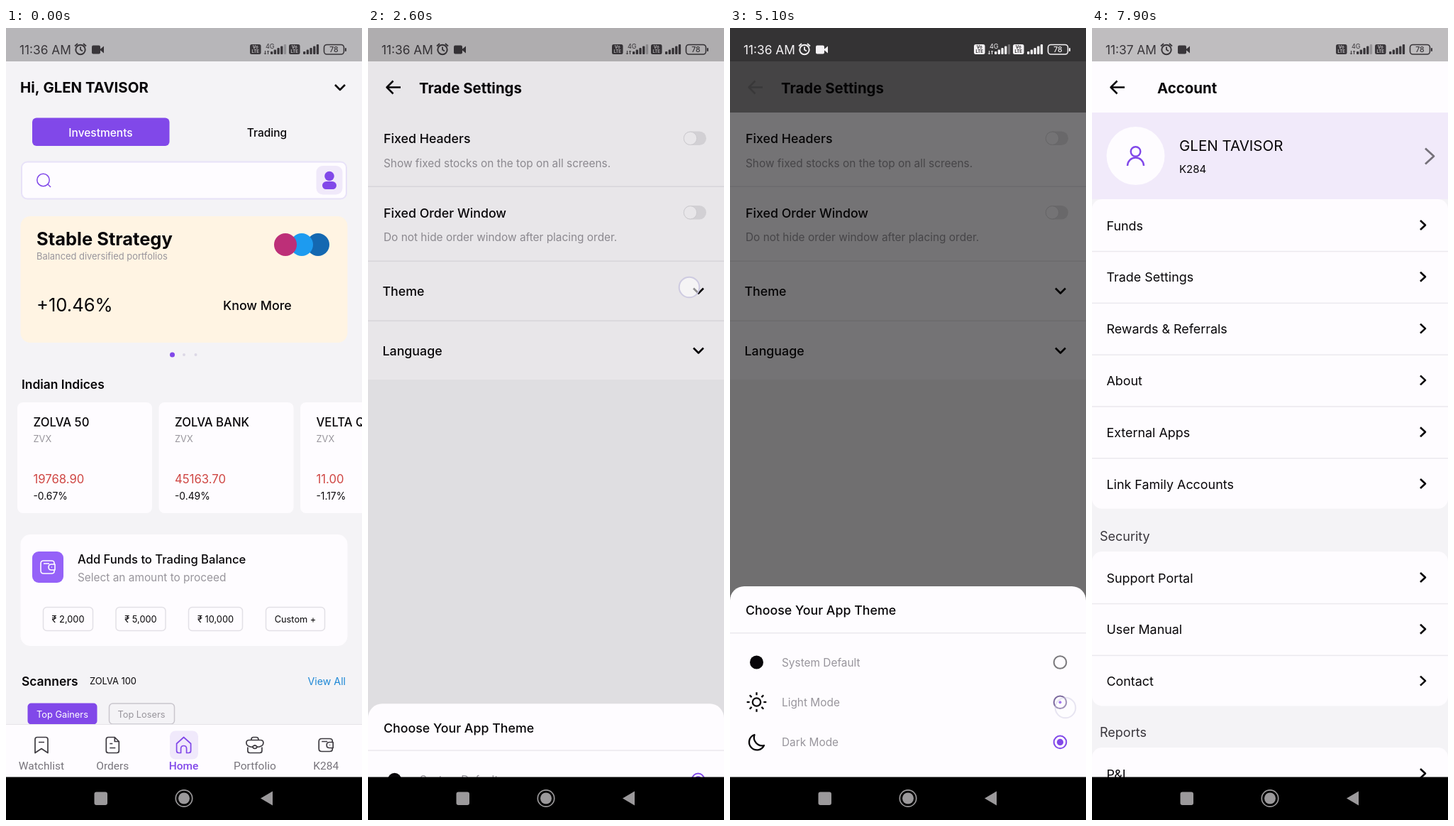
Recreate the animation shown at these times as an HTML page with a canvas. Size 502x1115 px, loop 8 s.

```html
<!DOCTYPE html>
<html lang="en">
<head>
<meta charset="utf-8">
<title>Trading app theme settings</title>
<style>
html, body { margin: 0; width: 100%; height: 100%; overflow: hidden; background: #000; }
canvas { display: block; width: 502px; height: 1115px; }
</style>
</head>
<body>
<canvas id="stage"></canvas>
<script>
const W = 502, H = 1115, LOOP = 8000;
const PURPLE = '#8148e9', PAGE = '#f4f3f6', SURFACE = '#fefcff', LAVENDER = '#f1eafa';
const INK = '#080609', GRAY = '#98959c', RULE = '#ebe9ee', RED = '#cf4643';
const USER = 'GLEN TAVISOR', USER_ID = 'K284';
const DOWN = 'M-7-3.5L0 3.5 7-3.5', RIGHT = 'M-3.5-6.5L3.5 0-3.5 6.5', BACK = 'M10 0H-9M-.5-9L-9.5 0-.5 9';
const WALLET = 'M9-4V-6Q9-9 5-9H-6Q-10-9-10-5V5Q-10 9-6 9H5Q9 9 9 6V4M10-4H5Q1-4 1 0T5 4H10ZM5 0H6M-6-5H2';

const canvas = document.getElementById('stage');
const ctx = canvas.getContext('2d');
const scale = window.devicePixelRatio || 1;
canvas.width = W * scale;
canvas.height = H * scale;

const clamp = v => Math.max(0, Math.min(1, v));
const progress = (t, start, length) => clamp((t - start) / length);
const easeOut = p => 1 - (1 - p) ** 3;

function mix(a, b, p) {
  const channel = (hex, i) => parseInt(hex.slice(i, i + 2), 16);
  return `rgb(${[1, 3, 5].map(i => Math.round(channel(a, i) + (channel(b, i) - channel(a, i)) * p))})`;
}

// y is the middle of the capital letters.
function text(s, x, y, size, color = INK, weight = 400, align = 'left', family = 'Inter') {
  ctx.font = `${weight} ${size}px ${family}, sans-serif`;
  ctx.textAlign = align;
  ctx.fillStyle = color;
  ctx.fillText(s, x, y + size * 0.364);
}

function rect(x, y, w, h, fill) {
  ctx.fillStyle = fill;
  ctx.fillRect(x, y, w, h);
}

function box(x, y, w, h, r, fill, stroke, width = 1.5) {
  ctx.beginPath();
  ctx.roundRect(x, y, w, h, r);
  if (fill) { ctx.fillStyle = fill; ctx.fill(); }
  if (stroke) { ctx.strokeStyle = stroke; ctx.lineWidth = width; ctx.stroke(); }
}

const circle = (x, y, r, fill, stroke, width) => box(x - r, y - r, 2 * r, 2 * r, r, fill, stroke, width);

function icon(path, x, y, color, width = 2, filled = false) {
  ctx.save();
  ctx.translate(x, y);
  ctx.lineJoin = 'round';
  ctx.lineWidth = width;
  ctx.strokeStyle = ctx.fillStyle = color;
  const shape = new Path2D(path);
  if (filled) ctx.fill(shape); else ctx.stroke(shape);
  ctx.restore();
}

function page(x, draw) {
  if (x >= W) return;
  ctx.save();
  ctx.translate(x, 0);
  draw();
  rect(0, 0, W, 47, 'rgba(0,0,0,.25)');
  ctx.restore();
}

function home() {
  rect(0, 0, W, H, PAGE);
  text('Hi, ' + USER, 20, 84, 20.4, INK, 700);
  icon(DOWN, 471, 83.5, INK, 2.6);
  box(37, 126.5, 193.5, 39.5, 6, PURPLE);
  text('Investments', 133.5, 147, 15.5, '#fff', 500, 'center');
  text('Trading', 368, 147, 15.5, INK, 500, 'center');

  box(22, 188.5, 458, 52, 8, SURFACE, '#e8e2f8', 2);
  circle(52.5, 214, 8.7, null, PURPLE, 1.5);
  icon('M0 0L4 4', 59, 220, PURPLE, 1.5);
  box(437.5, 194, 37, 40.5, 9, '#f0e9fa');
  circle(456, 208.5, 6.8, PURPLE);
  box(446, 216, 20, 11, [10, 10, 9, 9], PURPLE);

  box(20.5, 265, 461, 178, 14, '#fff4e3');
  text('Stable Strategy', 43, 297, 25.5, INK, 700);
  text('Balanced diversified portfolios', 43, 321.5, 12.9, GRAY);
  text('+10.46%', 43, 390, 25.6);
  text('Know More', 306, 391, 17.8, INK, 500);
  circle(440, 305, 16, '#1468b1');
  circle(417, 305, 16, '#1d9bf0');
  circle(394, 305, 16, '#bd2f78');
  circle(234.5, 460, 3.5, PURPLE);
  circle(251, 460, 2, '#dcd8e6');
  circle(267.5, 460, 2, '#dcd8e6');

  text('Indian Indices', 22, 502, 17.4, INK, 600);
  [['ZOLVA 50', '19768.90', '-0.67%'], ['ZOLVA BANK', '45163.70', '-0.49%'], ['VELTA QUO', '11.00', '-1.17%']]
    .forEach(([name, price, change], i) => {
      const x = 16 + i * 199.5;
      box(x, 527, 190, 156, 8, SURFACE);
      text(name, x + 22.5, 554.5, 16.7, INK, 500);
      text('ZVX', x + 22.5, 578, 12.8, GRAY);
      text(price, x + 22.5, 635, 16.7, RED);
      text(change, x + 22.5, 658.5, 13.8);
    });

  box(20.5, 713, 461, 157, 14, SURFACE);
  box(37, 737, 44, 44, 9, '#9562f8');
  icon(WALLET, 59, 759, '#fff', 1.6);
  text('Add Funds to Trading Balance', 101, 748, 16.6, INK, 500);
  text('Select an amount to proceed', 101, 773, 15.4, GRAY);
  [['₹ 2,000', 52, 71], ['₹ 5,000', 154.5, 71], ['₹ 10,000', 257, 77], ['Custom +', 366, 84]]
    .forEach(([label, x, w]) => {
      box(x + .5, 815.5, w - 1, 33, 5, null, '#e2e0e6');
      text(label, x + w / 2, 832.5, 12.8, INK, 400, 'center');
    });

  text('Scanners', 22, 919.5, 17.4, INK, 600);
  text('ZOLVA 100', 118, 919.5, 12.9);
  text('View All', 479, 919.5, 14.2, '#1e88d6', 400, 'right');
  box(30.5, 950.5, 98, 30, 5, PURPLE);
  text('Top Gainers', 79.5, 966, 12.8, '#fff', 400, 'center');
  box(145.5, 951, 92, 29, 5, null, '#c9c6cd');
  text('Top Losers', 191, 966, 12.8, GRAY, 400, 'center');
  tabBar();
}

function tabBar() {
  rect(0, 980, W, 1, '#e6e4e9');
  rect(0, 981, W, 74, SURFACE);
  box(231, 989.5, 40, 40, 8, '#f0e9fb');
  [
    ['Watchlist', 'M-9 11V-8Q-9-11-6-11H6Q9-11 9-8V11L0 5ZM-4-4H4'],
    ['Orders', 'M-9-8Q-9-11-6-11H3L9-5V8Q9 11 6 11H-6Q-9 11-9 8ZM3-11V-5H9M-4-2H0M-4 4H4'],
    ['Home', 'M-10-2L0-11 10-2V8Q10 11 7 11H4V5Q4 1 0 1T-4 5V11H-7Q-10 11-10 8Z'],
    ['Portfolio', 'M-5-7V-8Q-5-11-2-11H2Q5-11 5-8V-7M-3 3Q-12 2-12-3-12-7-8-7H8Q12-7 12-3 12 2 3 3M-10 3V8Q-10 11-7 11H7Q10 11 10 8V3M-3 2Q0-1 3 2 3 5 0 5T-3 2Z'],
    [USER_ID, WALLET]
  ].forEach(([label, path], i) => {
    const x = 50 + i * 100.3, active = i === 2;
    icon(path, x, 1009.5, active ? PURPLE : '#3d3a40', 1.7);
    text(label, x, 1038, 15.5, active ? PURPLE : '#77747b', active ? 500 : 400, 'center', 'Roboto');
  });
}

function menu(top, labels) {
  box(0, top, W, labels.length * 72.8 - 1, 14, SURFACE);
  labels.forEach((label, i) => {
    const y = top + 37 + i * 72.8;
    if (i) rect(0, y - 37, W, 1.5, RULE);
    text(label, 20.5, y, 17.9);
    icon(RIGHT, 466.5, y - .5, INK, 2.6);
  });
}

function account() {
  rect(0, 0, W, H, PAGE);
  rect(0, 0, W, 119, SURFACE);
  icon(BACK, 36, 83.5, INK, 2.5);
  text('Account', 92, 84.5, 20.4, INK, 700);
  rect(0, 119, W, 122, LAVENDER);
  circle(61.5, 180, 41, SURFACE);
  circle(61.5, 174, 6.8, null, PURPLE, 2.4);
  icon('M-11.5 8A11.5 11.5 0 0 1 11.5 8', 61.5, 186, PURPLE, 2.4);
  text(USER, 123, 166, 20.5);
  text(USER_ID, 123, 199, 15);
  icon('M-6-11L6 0-6 11', 476, 180.5, '#757179', 2.8);
  menu(241, ['Funds', 'Trade Settings', 'Rewards & Referrals', 'About', 'External Apps', 'Link Family Accounts']);
  text('Security', 11, 715, 18, '#39363c');
  menu(737, ['Support Portal', 'User Manual', 'Contact']);
  text('Reports', 11, 991.5, 18, '#39363c');
  menu(1013, ['P&L', '']);
}

function colors(dark) {
  return dark
    ? { page: '#121212', surface: '#212121', ink: '#ffffff', rule: '#343434', track: '#4a4a4a' }
    : { page: PAGE, surface: SURFACE, ink: INK, rule: RULE, track: '#e6e4e8' };
}

function settings(theme, barDark) {
  rect(0, 0, W, H, theme.page);
  rect(0, 0, W, 495, theme.surface);
  rect(0, 0, W, 119, mix(SURFACE, '#212121', barDark));
  icon(BACK, 36, 83.5, mix(INK, '#ffffff', barDark), 2.5);
  text('Trade Settings', 72, 84.5, 20.4, theme.ink, 700);
  [['Fixed Headers', 'Show fixed stocks on the top on all screens.', 156],
   ['Fixed Order Window', 'Do not hide order window after placing order.', 260.5]].forEach(([title, note, y]) => {
    text(title, 22, y, 17.8, theme.ink, 500);
    text(note, 22, y + 34, 15.4, GRAY);
    box(445, y - 10.5, 32, 19.5, 10, theme.track);
    circle(454.5, y - .7, 9.2, SURFACE, '#dedce1', 1);
  });
  [['Theme', 370.5], ['Language', 454.5]].forEach(([title, y]) => {
    text(title, 20.5, y, 17.8, theme.ink, 500);
    icon(DOWN, 466, y - .5, theme.ink, 2.6);
  });
  for (const y of [222.5, 327.5, 411.5]) rect(0, y, W, 1.5, theme.rule);
}

function radio(y, on) {
  circle(465.5, y, 8.8, null, mix('#7a787c', PURPLE, clamp(on * 2)), 2);
  if (on) circle(465.5, y, 5 * Math.sqrt(on), PURPLE);
}

function sheet(top, theme, selected) {
  box(0, top, W, 340, 20, theme.surface);
  text('Choose Your App Theme', 22, top + 34, 17.8, theme.ink, 500);
  rect(0, top + 65, W, 1.5, theme.rule);
  ['System Default', 'Light Mode', 'Dark Mode'].forEach((label, i) => {
    const y = top + 107 + i * 56.2;
    text(label, 73, y, 15.4, GRAY);
    radio(y, selected[i]);
  });
  circle(37.5, top + 107, 9.5, theme.ink);
  const sunY = top + 163;
  circle(37.5, sunY, 5.7, null, theme.ink, 2.3);
  for (let i = 0; i < 8; i++) {
    const c = Math.cos(i * Math.PI / 4), s = Math.sin(i * Math.PI / 4);
    icon(`M${c * 9.8} ${s * 9.8}L${c * 13.8} ${s * 13.8}`, 37.5, sunY, theme.ink, 2.3);
  }
  icon('M-3-10.5A11 11 0 1 0 10.5 4.5 11.5 11.5 0 0 1-3-10.5Z', 37.5, top + 219.5, theme.ink, 2.3);
}

function signal(x, color, bars) {
  for (let i = 0; i < 5; i++) {
    ctx.globalAlpha = i < bars ? 1 : .3;
    const h = 4 + i * 2.5;
    box(x + i * 4.7, 37 - h, 3.3, h, 1, color);
  }
  ctx.globalAlpha = 1;
}

function statusBar(t, color, back) {
  text(t < 6100 ? '11:36 AM' : '11:37 AM', 19, 31, 17.3, color);
  circle(105, 30.5, 6.7, null, color, 2);
  icon('M0-4V0L3 2M-8-5L-4-8.5M8-5L4-8.5', 105, 30.5, color, 1.8);
  box(121, 24.5, 12, 12, 2, color);
  icon('M0 0L6-5V5Z', 132, 30.5, color, 1, true);
  for (const x of [344, 399]) {
    box(x, 23, 15.5, 14, 2.5, color);
    text('Vo', x + 7.7, 27, 6, back, 700, 'center');
    text('LTE', x + 7.7, 33.3, 6, back, 700, 'center');
  }
  text('4G', 366, 25.5, 9, color);
  ctx.globalAlpha = t > 1000 && t < 2000 ? .4 : 1;
  icon('M-1.5-2V3M-3 1.5L-1.5 3 0 1.5M2.5 3V-2M1-.5L2.5-2 4-.5', 367, 34, color, 1);
  ctx.globalAlpha = 1;
  signal(373, color, 4);
  signal(419, color, 5);
  box(448.5, 23.5, 28, 13.5, 4, null, color, 1.6);
  text('78', 462.5, 30.3, 10.5, color, 500, 'center');
  box(478, 28, 2, 5, 1, color);
}

function systemBar() {
  rect(0, 1054.5, W, 61, '#000');
  box(124.5, 1075.5, 18.5, 18.5, 3, '#9b999b');
  circle(251, 1084.5, 8, '#9b999b');
  circle(251, 1084.5, 11.7, null, '#9b999b', 1.7);
  icon('M-9 0L8-10V10Z', 368, 1084.5, '#9b999b', 1, true);
}

function touch(t, x, y, start, end) {
  if (t < start || t > end) return;
  ctx.globalAlpha = clamp((end - t) / 200);
  circle(x, y, 14.3, 'rgba(255,255,255,.55)', 'rgba(200,196,222,.85)', 2);
  ctx.globalAlpha = 1;
}

function render(t) {
  ctx.setTransform(scale, 0, 0, scale, 0, 0);
  const accountX = W * (1 - easeOut(progress(t, 600, 400)));
  const settingsX = t < 7400
    ? W * (1 - easeOut(progress(t, 1800, 400)))
    : W * progress(t, 7400, 200);
  const theme = colors(t >= 3620 && t < 4995);
  const barDark = progress(t, 3620, 180) - progress(t, 4995, 200);

  if (accountX > 0) page(0, home);
  page(accountX, account);
  page(settingsX, () => settings(theme, barDark));

  const lightIcons = t >= 3700 && t < 5150;
  if (!lightIcons) statusBar(t, '#39363a', '#bdbabd');

  const rise = progress(t, 2547, 250), fall = progress(t, 6050, 200);
  const shown = fall ? (1 - fall) ** 2 : 1 - (1 - rise) ** 2;
  if (shown > 0) {
    rect(0, 0, W, H, `rgba(0,0,0,${.54 * (fall ? 1 - fall : rise ** 1.2)})`);
    const toDark = progress(t, 3620, 180), toLight = progress(t, 5070, 200);
    sheet(1055 - 269 * shown, theme, [1 - toDark, toLight, toDark - toLight]);
  }
  if (lightIcons) statusBar(t, '#f4f2f4', '#333133');

  touch(t, 456, 214, 100, 600);
  touch(t, 286, 343.5, 1700, 2000);
  touch(t, 453, 365, 2480, 2800);
  touch(t, 460, 1016, 3450, 3700);
  touch(t, 473, 957, 4880, 5200);
  systemBar();
}

const began = performance.now();
(function frame() {
  render((performance.now() - began) % LOOP);
  requestAnimationFrame(frame);
})();
</script>
</body>
</html>
```
